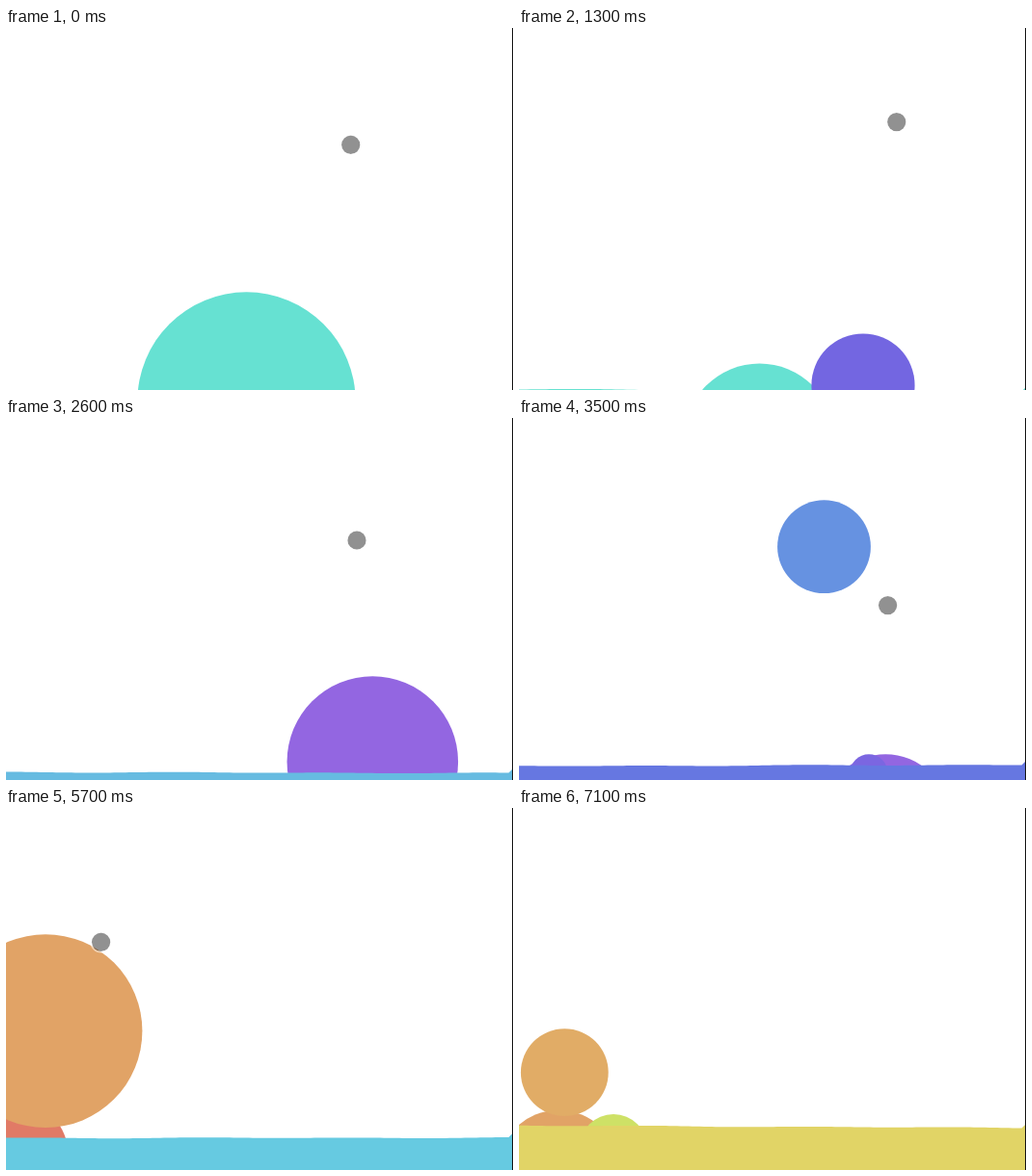
Animation, 526 px wide and 376 px high, one loop 7200 ms. Source, as an HTML page with a canvas:

```html
<!DOCTYPE html>
<html>
<head>
<meta charset="utf-8">
<title>Falling drops</title>
<style>
html, body { margin: 0; width: 100%; height: 100%; overflow: hidden; background: #fff; }
canvas { display: block; }
</style>
</head>
<body>
<canvas id="stage" width="526" height="376"></canvas>
<script>
const W = 526, H = 376, LOOP = 7.2;
const GRAVITY = 1640, SHRINK = 27, SINK_TIME = 0.8;
const ctx = document.getElementById('stage').getContext('2d');

const drop = (t, x, y, r) => ({ t, x, y, r });
const point = (t, x, y) => ({ t, x, y });

// Each ball is released at the pointer; the first falls before the loop begins.
const balls = [
  drop(-3.05, 249.5, 30, 183),
  drop(0.38, 357, 121, 65),
  drop(1.42, 380.3, 98, 108),
  drop(2.78, 363, 127, 25),
  drop(3.33, 316.5, 110, 48),
  drop(4.58, 11.5, 96, 70),
  drop(5.27, 41, 80, 100),
  drop(6.13, 98, 120, 49),
  drop(6.68, 47.3, 130, 45)
];

// Places the pointer visits between releases.
const pointerPath = [
  ...balls,
  point(0, 357.7, 121.3), point(0.7, 379.3, 92), point(0.9, 465, 95),
  point(1.8, 374, 127), point(3.5, 382.6, 194.6), point(4.8, 56.3, 109.4),
  point(5.7, 98.6, 139.3), point(7.1, 95.2, 156.8)
].sort((a, b) => a.t - b.t);

const mix = (a, b, u) => a + (b - a) * u;
const clamp = u => Math.min(1, Math.max(0, u));
const smooth = u => u * u * (3 - 2 * u);
const progress = (t, from, to) => clamp((t - from) / (to - from));

const color = hue => `hsl(${hue}, 67%, 64%)`;
const ballHue = x => 360 * x / W + 2;
const liquidHue = t =>
  mix(172, 243, progress(t, 1.9, 3.8)) - 199 * progress(t, 5.17, LOOP);
const level = t => Math.min(H + 0.3, 375 - 8.3 * (t - 1.8));

function disc(x, y, r, fill) {
  ctx.fillStyle = fill;
  ctx.beginPath();
  ctx.arc(x, y, r, 0, 2 * Math.PI);
  ctx.fill();
}

function drawBall(ball, t) {
  const age = t - ball.t;
  if (age < 0) return;
  const surface = level(ball.t + 0.47);
  const fallTime = Math.sqrt(2 * (surface - ball.r - ball.y) / GRAVITY);
  let r = ball.r, y = ball.y + GRAVITY * age * age / 2;
  if (age > fallTime) {
    const wet = age - fallTime;
    const depth = 105 + 0.13 * ball.r;
    r -= SHRINK * wet;
    y = surface + depth * (1 - Math.exp(-wet / SINK_TIME)) - r;
  }
  if (r > 0) disc(ball.x, y, r + 0.4, color(ballHue(ball.x)));
}

function drawLiquid(t) {
  if (t < 1) return;
  const tilt = -2.4 * Math.cos(1.15 * (t - 4.4));
  const surface = x => level(t) + tilt * (x / W - 0.5)
    + 0.35 * Math.sin(x / 26 + t * 1.7) + 0.2 * Math.sin(x / 47 - t * 2.3);
  const corner = W - 4.5;
  ctx.fillStyle = color(liquidHue(t));
  ctx.beginPath();
  ctx.moveTo(0, H);
  for (let x = 0; x < corner; x += 4) ctx.lineTo(x, surface(x));
  ctx.lineTo(corner, surface(corner));
  ctx.lineTo(W, surface(W) - 4.5);
  ctx.lineTo(W, H);
  ctx.fill();
}

function drawPointer(t) {
  const next = pointerPath.findIndex(p => p.t > t);
  const b = pointerPath.at(next), a = next < 0 ? b : pointerPath[next - 1];
  const u = smooth(progress(t, a.t, b.t));
  const x = mix(a.x, b.x, u), y = mix(a.y, b.y, u);
  disc(x, y, 9.7, 'rgba(0, 0, 0, 0.43)');
  ctx.strokeStyle = 'rgba(255, 255, 255, 0.5)';
  ctx.lineWidth = 1.6;
  ctx.beginPath();
  ctx.arc(x, y, 10.4, 0, 2 * Math.PI);
  ctx.stroke();
}

function draw(now) {
  const t = (now / 1000) % LOOP;
  ctx.fillStyle = '#fff';
  ctx.fillRect(0, 0, W, H);
  balls.forEach(ball => drawBall(ball, t));
  drawLiquid(t);
  drawPointer(t);
  ctx.fillStyle = '#111';
  ctx.fillRect(W - 1, 0, 1, H);
}

let start;
function tick(now) {
  start ??= now;
  draw(now - start);
  requestAnimationFrame(tick);
}
draw(0);
requestAnimationFrame(tick);
</script>
</body>
</html>
```
